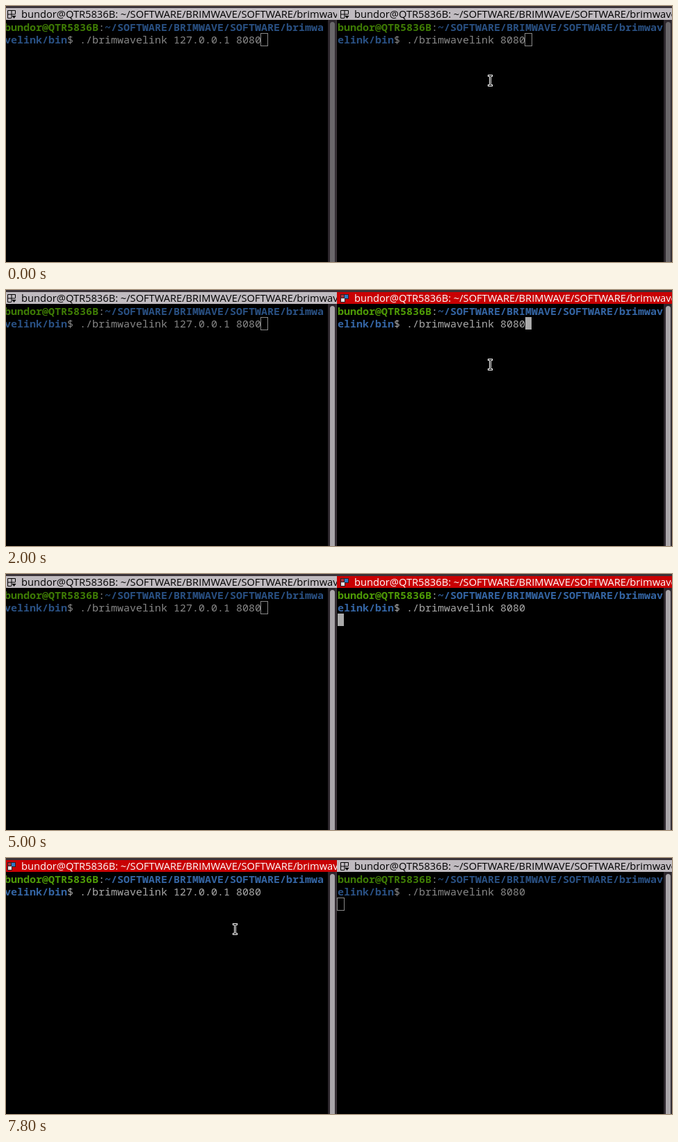
An HTML page for the animation above (8 s loop, 958 by 369 pixels).

```html
<!DOCTYPE html>
<html lang="en">
<head>
<meta charset="utf-8">
<title>Two terminals</title>
<style>
  @property --on { syntax: "<number>"; inherits: true; initial-value: 0; }

  html, body { margin: 0; width: 100%; height: 100%; overflow: hidden; background: #000; }
  .stage { position: relative; width: 958px; height: 369px; overflow: hidden; background: #000; }
  .stage::before { content: ""; position: absolute; inset: 0 0 auto; height: 3px; background: #3a3338; }

  /* --on is 1 while a pane has the focus */
  .pane { position: absolute; top: 0; height: 369px; overflow: hidden; }
  .left { left: -3px; width: 479px; animation: focus-left 8s step-end infinite; }
  .right { left: 476px; width: 483px; animation: focus-right 8s step-end infinite; }

  .bar {
    position: absolute; top: 3px; left: 0; right: 0; height: 17px; overflow: hidden;
    font: 11pt/17px "Open Sans", "Noto Sans", sans-serif; white-space: pre; text-indent: 25px;
  }
  .idle { background: #c0bbc0; color: #000; }
  .live { background: #c80003; color: #fff; opacity: var(--on); }
  .bar svg { position: absolute; left: 4px; top: 2px; }

  .text {
    position: absolute; left: 1px; top: 21px; color: #aaa;
    font: 15px/18px "Noto Sans Mono", "DejaVu Sans Mono", monospace;
    opacity: calc(.8 + .2 * var(--on));
  }
  .text div { height: 18px; white-space: pre; }
  b { color: #3465a4; }
  b.user { color: #4e9a06; }

  .caret { position: absolute; top: 39px; }
  .block, .hollow { position: absolute; box-sizing: border-box; }
  .block { width: 9px; height: 18px; background: #aaa; opacity: 0; }
  .hollow { left: -1px; width: 11px; height: 19px; border: 1px solid #888; opacity: calc(1 - var(--on)); }
  .left .caret { left: 370px; }
  .right .caret { left: 271px; animation: enter 8s step-end infinite; }
  .left .block { animation: blink-left 8s step-end infinite; }
  .right .block { animation: blink-right 8s step-end infinite; }

  .scroll {
    position: absolute; top: 20px; right: 0; bottom: 0; width: 13px; box-sizing: border-box;
    background: #2d272d; border-right: 2px solid #3a3338;
  }
  .scroll::before {
    content: ""; position: absolute; top: 3px; right: 1px; bottom: 0; width: 7px;
    border-radius: 4px 4px 0 0;
    animation: scroll 8s step-end infinite;
  }

  .mouse { position: absolute; left: 0; top: 0; animation: mouse 8s step-end infinite; }

  @keyframes focus-left { 0% { --on: 0; } 75% { --on: 1; } }
  @keyframes focus-right { 0%, 75% { --on: 0; } 10% { --on: 1; } }
  @keyframes blink-left {
    0%, 87.5%, 97.5% { opacity: 0; }
    75%, 92.5% { opacity: 1; }
  }
  @keyframes blink-right {
    0%, 17.5%, 37.5%, 47.5%, 55%, 72.5% { opacity: 0; }
    10%, 25%, 42.5%, 50%, 62.5% { opacity: 1; }
  }
  @keyframes enter { 0% { transform: none; } 50% { transform: translate(-270px, 18px); } }
  @keyframes scroll { 0% { background: #6a676a; } 12.5% { background: #a9a5a9; } }
  @keyframes mouse {
    0% { transform: translate(693px, 99px); opacity: 1; }
    50% { transform: translate(693px, 99px); opacity: 0; }
    65% { transform: translate(672px, 96px); opacity: 1; }
    67.5% { transform: translate(545px, 95px); opacity: 1; }
    70% { transform: translate(476px, 95px); opacity: 1; }
    72.5% { transform: translate(326px, 94px); opacity: 1; }
  }
</style>
</head>
<body>
<svg width="0" height="0" style="position:absolute">
  <symbol id="grid" viewBox="0 0 14 14">
    <path d="M1.5 1.5h11v5M1.5 1.5v11h5M7 1.5v11M1.5 7h11" fill="none" stroke="#000"/>
    <path d="M7.5 9h6l-3 4z" fill="#000"/>
  </symbol>
  <symbol id="tiles" viewBox="0 0 14 14">
    <path d="M1 1h12v12H1z" fill="#2b2226"/>
    <path d="M2 2h4v4H2z" fill="#a8323a"/>
    <path d="M7 2h5v5H7z" fill="#2f78c4"/>
    <path d="M2 7h5v5H2z" fill="#e4dfe2"/>
    <path d="M8 8h5v5H8z" fill="#c80003"/>
  </symbol>
</svg>

<div class="stage">
  <div class="pane left">
    <div class="bar idle"><svg width="14" height="14"><use href="#grid"/></svg>bundor@QTR5836B: ~/SOFTWARE/BRIMWAVE/SOFTWARE/brimwavelink</div>
    <div class="bar live"><svg width="14" height="14"><use href="#tiles"/></svg>bundor@QTR5836B: ~/SOFTWARE/BRIMWAVE/SOFTWARE/brimwavelink</div>
    <div class="text">
      <div><b class="user">bundor@QTR5836B</b>:<b>~/SOFTWARE/BRIMWAVE/SOFTWARE/brimwa</b></div>
      <div><b>velink/bin</b>$ ./brimwavelink 127.0.0.1 8080</div>
    </div>
    <div class="caret"><div class="block"></div><div class="hollow"></div></div>
    <div class="scroll"></div>
  </div>

  <div class="pane right">
    <div class="bar idle"><svg width="14" height="14"><use href="#grid"/></svg>bundor@QTR5836B: ~/SOFTWARE/BRIMWAVE/SOFTWARE/brimwavelink</div>
    <div class="bar live"><svg width="14" height="14"><use href="#tiles"/></svg>bundor@QTR5836B: ~/SOFTWARE/BRIMWAVE/SOFTWARE/brimwavelink</div>
    <div class="text">
      <div><b class="user">bundor@QTR5836B</b>:<b>~/SOFTWARE/BRIMWAVE/SOFTWARE/brimwav</b></div>
      <div><b>elink/bin</b>$ ./brimwavelink 8080</div>
    </div>
    <div class="caret"><div class="block"></div><div class="hollow"></div></div>
    <div class="scroll"></div>
  </div>

  <svg class="mouse" width="7" height="17" shape-rendering="crispEdges">
    <path d="M0 0h7v3H5v11h2v3H0v-3h2V3H0z" fill="#fff"/>
    <path d="M1 1h5v1H4v13h2v1H1v-1h2V2H1z" fill="#000"/>
  </svg>
</div>
</body>
</html>
```
